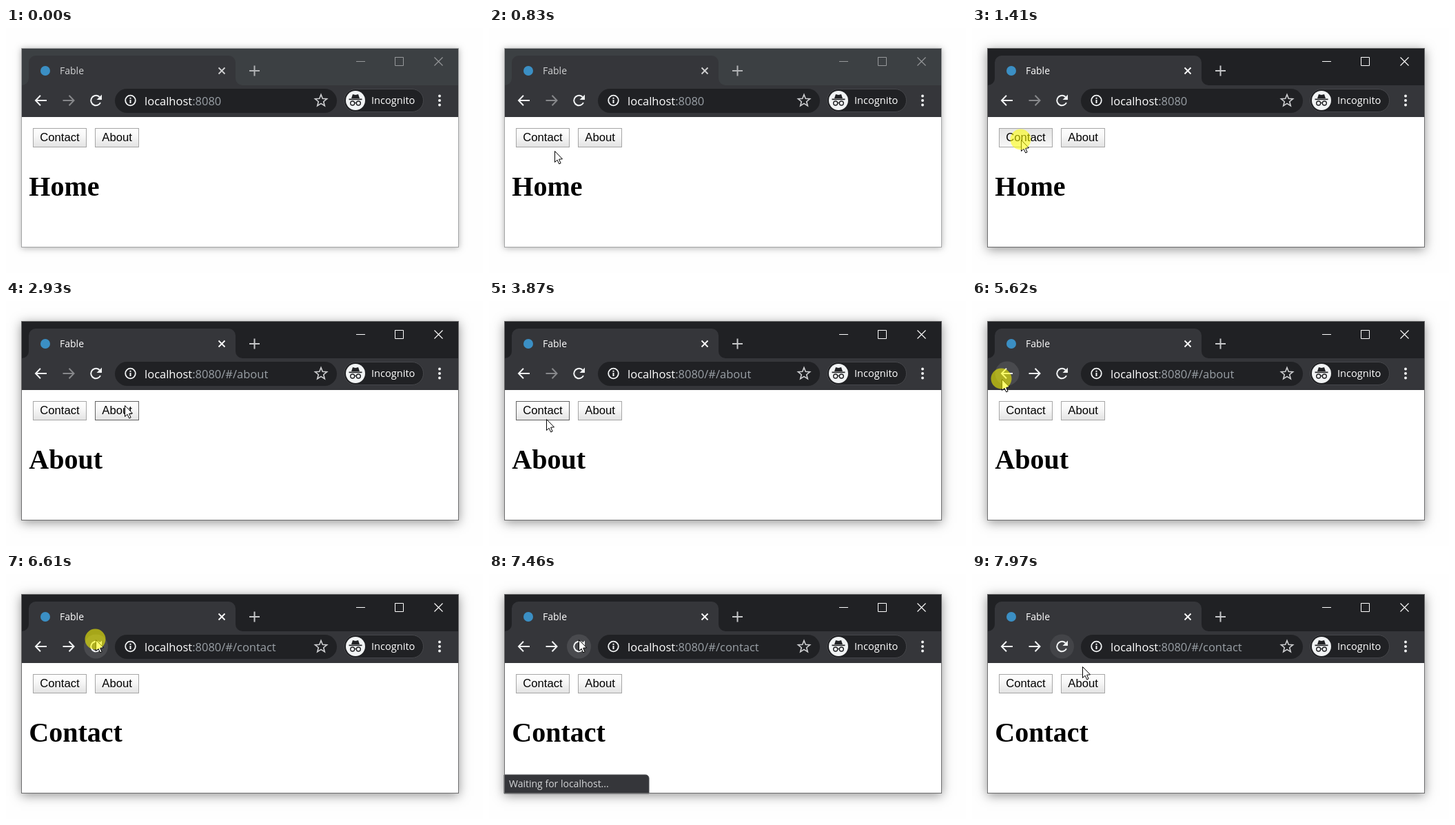
Write an HTML page with a canvas that moves like this. It is 692x355 px and loops after 7.99 s.

```html
<!DOCTYPE html>
<html lang="en">
<head>
<meta charset="utf-8">
<title>Browser navigation</title>
<style>
html, body { margin: 0; width: 100%; height: 100%; overflow: hidden; background: #fefefe; }
canvas { display: block; width: 692px; height: 355px; }
</style>
</head>
<body>
<canvas id="stage" width="692" height="355"></canvas>
<script>
const ctx = document.getElementById('stage').getContext('2d');
const LOOP = 7990;
const UI = '"Open Sans", "Noto Sans", sans-serif';
const BAR = '#35363a', DARK = '#202124', ICON = '#f1f3f4';

// start ms, end ms, x and y reached at the end
const moves = [
  [210, 1000, 72, 170], [1020, 1100, 71, 162], [2120, 2560, 172, 151],
  [3690, 3870, 83, 171], [4400, 4700, 43, 113], [6140, 6360, 130, 95],
  [7790, 7970, 160, 134]
];
const presses = [[1410, 1520], [2770, 2930], [4000, 4070], [4940, 5010], [5620, 5690], [6610, 6700]];
const pages = [[0, 'Home', ''], [1520, 'Contact', '/#/contact'], [2930, 'About', '/#/about'],
  [4070, 'Contact', '/#/contact'], [5010, 'About', '/#/about'], [5690, 'Contact', '/#/contact']];

const clamp = v => Math.max(0, Math.min(1, v));
const smooth = v => v * v * (3 - 2 * v);
const easeOut = v => 1 - (1 - v) ** 2;

function pointer(t) {
  let x = 574, y = 345;
  for (const [start, end, toX, toY] of moves) {
    if (t < start) break;
    const v = clamp((t - start) / (end - start));
    const k = start === 210 ? easeOut(v) : smooth(v);
    x += (toX - x) * k;
    y += (toY - y) * k;
  }
  return { x, y };
}

const inside = (p, x, y, w, h) => p.x >= x && p.x < x + w && p.y >= y && p.y < y + h;

function rect(x, y, w, h, fill) {
  ctx.fillStyle = fill;
  ctx.fillRect(x, y, w, h);
}

function pill(x, y, w, h, r, fill, stroke) {
  ctx.beginPath();
  ctx.roundRect(x, y, w, h, r);
  ctx.fillStyle = fill;
  ctx.fill();
  if (stroke) {
    ctx.strokeStyle = stroke;
    ctx.lineWidth = 1;
    ctx.stroke();
  }
}

function disc(x, y, r, fill) {
  ctx.beginPath();
  ctx.arc(x, y, r, 0, Math.PI * 2);
  ctx.fillStyle = fill;
  ctx.fill();
}

function ring(x, y, r, color, width, from = 0, to = Math.PI * 2) {
  ctx.beginPath();
  ctx.arc(x, y, r, from, to);
  ctx.strokeStyle = color;
  ctx.lineWidth = width;
  ctx.stroke();
}

function lines(color, width, ...paths) {
  ctx.beginPath();
  for (const p of paths) {
    ctx.moveTo(p[0], p[1]);
    for (let i = 2; i < p.length; i += 2) ctx.lineTo(p[i], p[i + 1]);
  }
  ctx.strokeStyle = color;
  ctx.lineWidth = width;
  ctx.stroke();
}

function text(str, x, y, font, fill) {
  ctx.font = font;
  ctx.fillStyle = fill;
  ctx.fillText(str, x, y);
  return x + ctx.measureText(str).width;
}

function drawFrame(active) {
  ctx.save();
  ctx.shadowColor = active ? 'rgba(0,0,0,.42)' : 'rgba(0,0,0,.3)';
  ctx.shadowBlur = active ? 15 : 9;
  ctx.shadowOffsetY = active ? 3 : 1;
  rect(22, 29, 635, 289, '#fff');
  ctx.restore();
  rect(22, 29, 635, 54, active ? DARK : '#3c4043');
  rect(22, 83, 635, 46, BAR);

  const c = active ? '#fff' : '#97999b';
  lines(c, 1, [508, 48.5, 521, 48.5], [564.5, 42.5, 576.5, 42.5, 576.5, 54.5, 564.5, 54.5, 564.5, 42]);
  lines(c, 1.1, [621.5, 42.5, 633.5, 54.5], [633.5, 42.5, 621.5, 54.5]);
}

function drawTab(t, active) {
  ctx.beginPath();
  ctx.moveTo(23, 83);
  ctx.arcTo(33, 83, 33, 73, 10);
  ctx.arcTo(33, 40, 43, 40, 10);
  ctx.arcTo(333, 40, 333, 50, 10);
  ctx.arcTo(333, 83, 343, 83, 10);
  ctx.closePath();
  ctx.fillStyle = BAR;
  ctx.fill();

  if (t >= 6760 && t < 7260) {
    const a = t / 130;
    ring(57, 62, 8, '#8ab4f8', 2, a, a + 2.4 + Math.sin(t / 110));
  } else {
    disc(57, 62, 7, '#3b8fc4');
  }
  const c = active ? '#fff' : '#d0d1d2';
  text('Fable', 78, 67, '14px ' + UI, c);
  lines(c, 1.8, [308.5, 57.5, 317.5, 66.5], [317.5, 57.5, 308.5, 66.5]);
  lines(active ? '#c6c7c9' : '#b2b4b6', 2, [353, 62, 368, 62], [360.5, 54.5, 360.5, 69.5]);
}

function arrow(x, dir, color) {
  lines(color, 2, [x - 8 * dir, 105, x + 7.5 * dir, 105],
    [x + 1 * dir, 97.8, x + 8 * dir, 105, x + 1 * dir, 112.2]);
}

function drawReload() {
  ring(130.5, 105, 7.2, ICON, 2, 0.45, 5.5);
  ctx.beginPath();
  ctx.moveTo(139, 96.5);
  ctx.lineTo(139, 104);
  ctx.lineTo(131.5, 104);
  ctx.fillStyle = ICON;
  ctx.fill();
}

function drawStar(x, y) {
  ctx.beginPath();
  for (let i = 0; i < 10; i++) {
    const r = i % 2 ? 3.9 : 9, a = i * Math.PI / 5 - Math.PI / 2;
    ctx.lineTo(x + r * Math.cos(a), y + r * Math.sin(a));
  }
  ctx.closePath();
  ctx.strokeStyle = '#cfd0d2';
  ctx.lineWidth = 1.6;
  ctx.stroke();
}

function drawIncognito() {
  pill(490.5, 88.5, 115, 33, 16.5, DARK, '#45464a');
  disc(507, 105, 14, ICON);
  ctx.beginPath();
  ctx.moveTo(501, 102);
  ctx.lineTo(503, 96);
  ctx.lineTo(507, 97);
  ctx.lineTo(511, 96);
  ctx.lineTo(513, 102);
  ctx.fillStyle = DARK;
  ctx.fill();
  rect(497.5, 102.5, 19, 1.7, DARK);
  ring(502.7, 109, 3, DARK, 1.4);
  ring(511.3, 109, 3, DARK, 1.4);
  lines(DARK, 1.3, [505.5, 108.5, 508.5, 108.5]);
  text('Incognito', 530, 110, '14.6px ' + UI, '#fff');
}

function drawToolbar(t, p, route) {
  const late = pointer(t - 120);
  const canForward = t >= 5010;
  // hover lingers briefly after the pointer leaves
  for (const [x, on] of [[51, true], [90.5, canForward], [130.5, true]]) {
    const hit = q => inside(q, x - 17, 88, 34, 34);
    if (on && t > 210 && (hit(p) || hit(late))) disc(x, 105, 17.5, hit(p) ? '#494a4e' : '#434448');
  }
  arrow(51, -1, ICON);
  arrow(90.5, 1, canForward ? ICON : '#87888b');
  drawReload();

  pill(158, 88, 322, 35, 17.5, DARK);
  ring(180.5, 105, 7.3, ICON, 1.8);
  rect(179.5, 104, 2, 5, ICON);
  rect(179.5, 100.8, 2, 2, ICON);
  const font = '16.5px ' + UI;
  const x = text('localhost', 201, 111.5, font, '#fff');
  text(':8080' + route, x, 111.5, font, '#9aa0a6');
  drawStar(457, 105.5);
  drawIncognito();
  for (const y of [98.5, 105, 111.5]) disc(629, y, 2, ICON);
}

function drawButton(label, x, w, p, pressed, visible) {
  const over = visible && inside(p, x, 145, w, 28);
  const down = over && pressed;
  const g = ctx.createLinearGradient(0, 145, 0, 173);
  g.addColorStop(0, down ? '#e4e4e4' : '#fefefe');
  g.addColorStop(0.4, down ? '#ebebeb' : '#f8f8f8');
  g.addColorStop(1, down ? '#f8f8f8' : '#e2e2e2');
  rect(x, 145, w, 28, g);
  ctx.strokeStyle = over && !down ? '#626262' : '#a6a6a6';
  ctx.lineWidth = 1;
  ctx.strokeRect(x + 0.5, 145.5, w - 1, 27);
  text(label, x + 10.3, 164, '16.67px "Liberation Sans", Arial, sans-serif', '#000');
}

function drawStatus(t) {
  const alpha = clamp((t - 6780) / 240) * (1 - clamp((t - 7460) / 200));
  if (!alpha) return;
  ctx.globalAlpha = alpha;
  pill(22, 291, 210, 27, [0, 5, 0, 0], BAR, '#4a4b4f');
  text('Waiting for localhost...', 29, 309, '14px ' + UI, '#d5d6d8');
  ctx.globalAlpha = 1;
}

function drawCursor({ x, y }, pressed) {
  const shape = [0, 0, 0, 16, 3.6, 12.7, 6.2, 18.4, 8.6, 17.4, 6.1, 11.7, 11, 11.3];
  ctx.beginPath();
  for (let i = 0; i < shape.length; i += 2) ctx.lineTo(x + 0.5 + shape[i], y + 0.5 + shape[i + 1]);
  ctx.closePath();
  ctx.fillStyle = '#fff';
  ctx.fill();
  ctx.strokeStyle = '#000';
  ctx.lineWidth = 1;
  ctx.stroke();
  if (pressed) disc(x - 0.5, y - 0.5, 15, 'rgba(255,255,0,.56)');
}

function draw(t) {
  const active = t >= 1410;
  const visible = t >= 210;
  const p = pointer(t);
  const pressed = presses.some(([a, b]) => t >= a && t < b);
  const [, title, route] = pages.filter(page => t >= page[0]).pop();

  rect(0, 0, 692, 355, '#fefefe');
  drawFrame(active);
  drawTab(t, active);
  drawToolbar(t, p, route);
  drawButton('Contact', 39, 78, p, pressed, visible);
  drawButton('About', 129, 64, p, pressed, visible);
  text(title, 33.3, 243, 'bold 40px "Liberation Serif", "Times New Roman", serif', '#000');
  drawStatus(t);
  ctx.strokeStyle = active ? '#6c6c6d' : '#a3a4a5';
  ctx.lineWidth = 1;
  ctx.strokeRect(22.5, 29.5, 634, 288);
  if (visible) drawCursor(p, pressed);
}

const begin = performance.now();
function tick() {
  draw((performance.now() - begin) % LOOP);
  requestAnimationFrame(tick);
}
tick();
</script>
</body>
</html>
```
